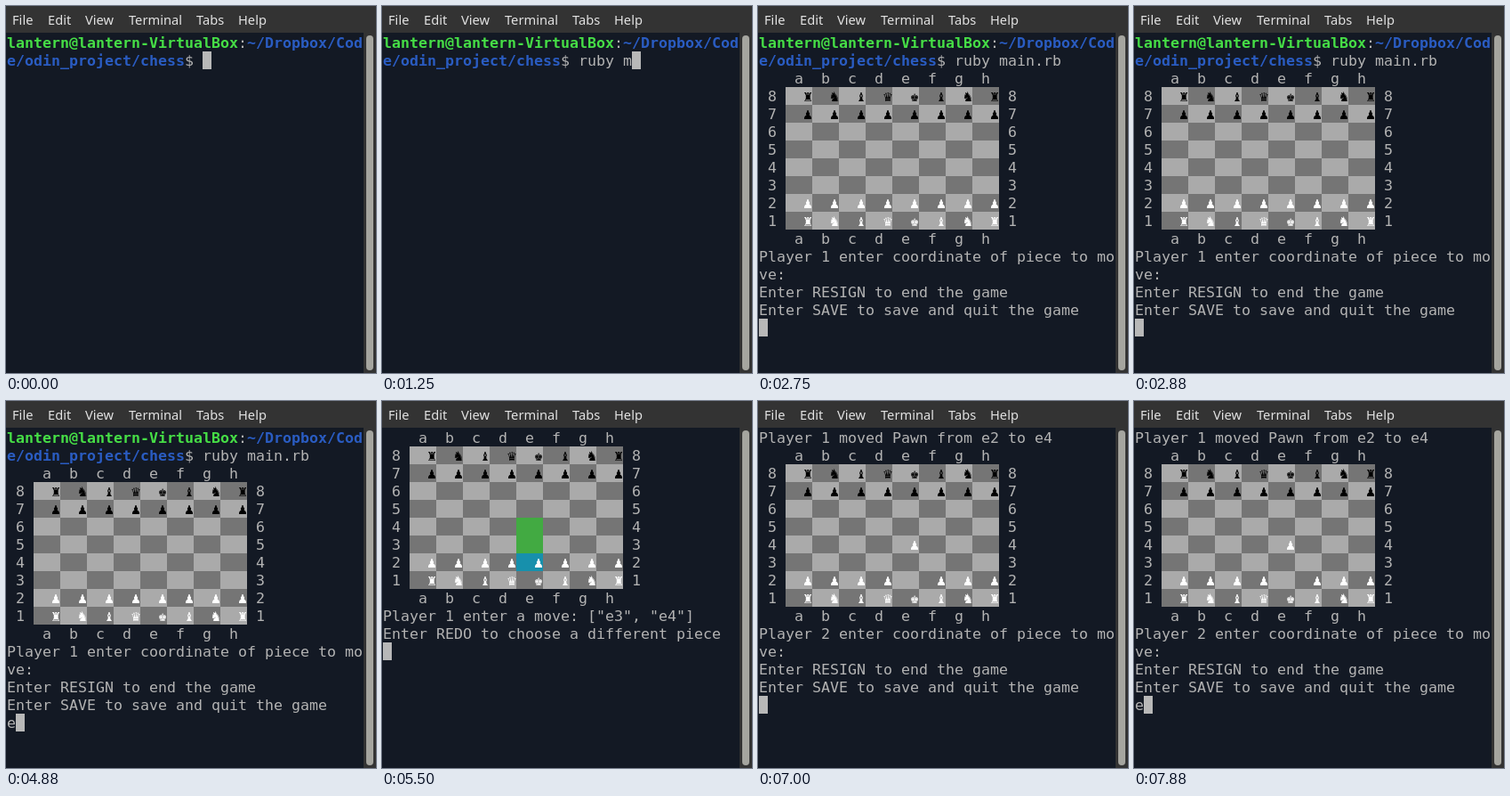
Animation, 416 px wide and 412 px high, one loop 8 s. Source, as an HTML page:

```html
<!DOCTYPE html>
<html lang="en">
<head>
<meta charset="utf-8">
<title>Terminal chess</title>
<style>
  html, body { margin: 0; width: 100%; height: 100%; overflow: hidden; background: #131924; }
  #stage { position: relative; width: 416px; height: 412px; overflow: hidden; background: #131924; }
  #menu { position: absolute; left: 0; top: 0; width: 416px; height: 30px; background: #333; }
  #menu span {
    position: absolute; top: 5px; color: #e2e2e2;
    font: 14.67px/20px "Noto Sans", sans-serif;
  }
  #gutter { position: absolute; left: 402px; top: 30px; width: 14px; height: 382px; background: #333; }
  #thumb { position: absolute; left: 3px; top: 3px; width: 8px; height: 376px; border-radius: 4px; background: #a5a59f; }
  /* The line height exceeds the row height so that text sits 1px lower in its row. */
  .screen {
    position: absolute; left: 1px; top: 31px; color: #b3b3b3; visibility: hidden;
    font: 16.61px/22px "DejaVu Sans Mono", monospace;
    font-variant-emoji: text; font-variant-ligatures: none;
  }
  .line { height: 20px; white-space: pre; }
  .user { color: #46de46; font-weight: bold; }
  .path { color: #2a5cc2; font-weight: bold; }
  .cell { display: inline-block; width: 30px; height: 20px; vertical-align: top; background: #757575; }
  .light { background: #aaa; }
  .move { background: #42aa42; }
  .pick { background: #1790ac; }
  .black { color: #000; }
  .white { color: #fff; }
  .cursor { display: inline-block; width: 10px; height: 20px; vertical-align: top; background: #b8b8b8; }
</style>
</head>
<body>
<div id="stage">
  <div id="menu">
    <span style="left:7px">File</span><span style="left:47px">Edit</span>
    <span style="left:89px">View</span><span style="left:138px">Terminal</span>
    <span style="left:214px">Tabs</span><span style="left:261px">Help</span>
  </div>
  <div id="gutter"><div id="thumb"></div></div>
</div>
<script>
const LOOP = 8000;
const START = [
  'rnbqkbnr', 'pppppppp', '........', '........',
  '........', '........', 'PPPPPPPP', 'RNBQKBNR'
];
const OPENED = START.slice();
OPENED[4] = '....P...';
OPENED[6] = 'PPPP.PPP';

const GLYPH = { k: '♚', q: '♛', r: '♜', b: '♝', n: '♞', p: '♟', '.': ' ' };
const FILES = '    a  b  c  d  e  f  g  h';

const span = (cls, text) => `<span class="${cls}">${text}</span>`;

function board(rows, marks = {}) {
  const ranks = rows.map((row, r) => {
    const rank = 8 - r;
    const cells = [...row].map((piece, c) => {
      const tone = marks['abcdefgh'[c] + rank] || ((r + c) % 2 ? '' : 'light');
      const side = piece === piece.toLowerCase() ? 'black' : 'white';
      return span(`cell ${tone} ${side}`, '  ' + GLYPH[piece.toLowerCase()]);
    });
    return ` ${rank} ${cells.join('')} ${rank}`;
  });
  return [FILES, ...ranks, FILES];
}

const ask = player => [
  `Player ${player} enter coordinate of piece to mo`, 've:',
  'Enter RESIGN to end the game',
  'Enter SAVE to save and quit the game'
];

const prompt = [
  span('user', 'lantern@lantern-VirtualBox') + ':' + span('path', '~/Dropbox/Cod'),
  span('path', 'e/odin_project/chess') + '$ '
];

// Each screen: its lines, when it appears, what is typed on its last line and when.
const screens = [
  { at: 0, lines: prompt, typed: 'ruby main.rb',
    keys: [380, 500, 630, 750, 1130, 1250, 1380, 1500, 1630, 1880, 2000, 2250] },
  { at: 2750, typed: 'e2', keys: [4880, 5250],
    lines: [prompt[0], prompt[1] + 'ruby main.rb', ...board(START), ...ask(1), ''] },
  { at: 5500, typed: 'e4', keys: [6380, 6630],
    lines: [...board(START, { e4: 'move', e3: 'move', e2: 'pick' }),
      'Player 1 enter a move: ["e3", "e4"]',
      'Enter REDO to choose a different piece', ''] },
  { at: 7000, typed: 'e', keys: [7880],
    lines: ['Player 1 moved Pawn from e2 to e4', ...board(OPENED), ...ask(2), ''] }
];

const stage = document.getElementById('stage');
for (const s of screens) {
  s.el = document.createElement('div');
  s.el.className = 'screen';
  s.el.innerHTML = s.lines.map(l => `<div class="line">${l}</div>`).join('');
  s.input = document.createElement('span');
  const cursor = document.createElement('span');
  cursor.className = 'cursor';
  s.el.lastChild.append(s.input, cursor);
  stage.append(s.el);
}

function draw(now) {
  const t = now % LOOP;
  const current = screens.filter(s => s.at <= t).pop();
  for (const s of screens) s.el.style.visibility = s === current ? 'visible' : 'hidden';
  const text = current.typed.slice(0, current.keys.filter(k => k <= t).length);
  if (current.input.textContent !== text) current.input.textContent = text;
}

function tick() {
  draw(performance.now());
  requestAnimationFrame(tick);
}
tick();
</script>
</body>
</html>
```
